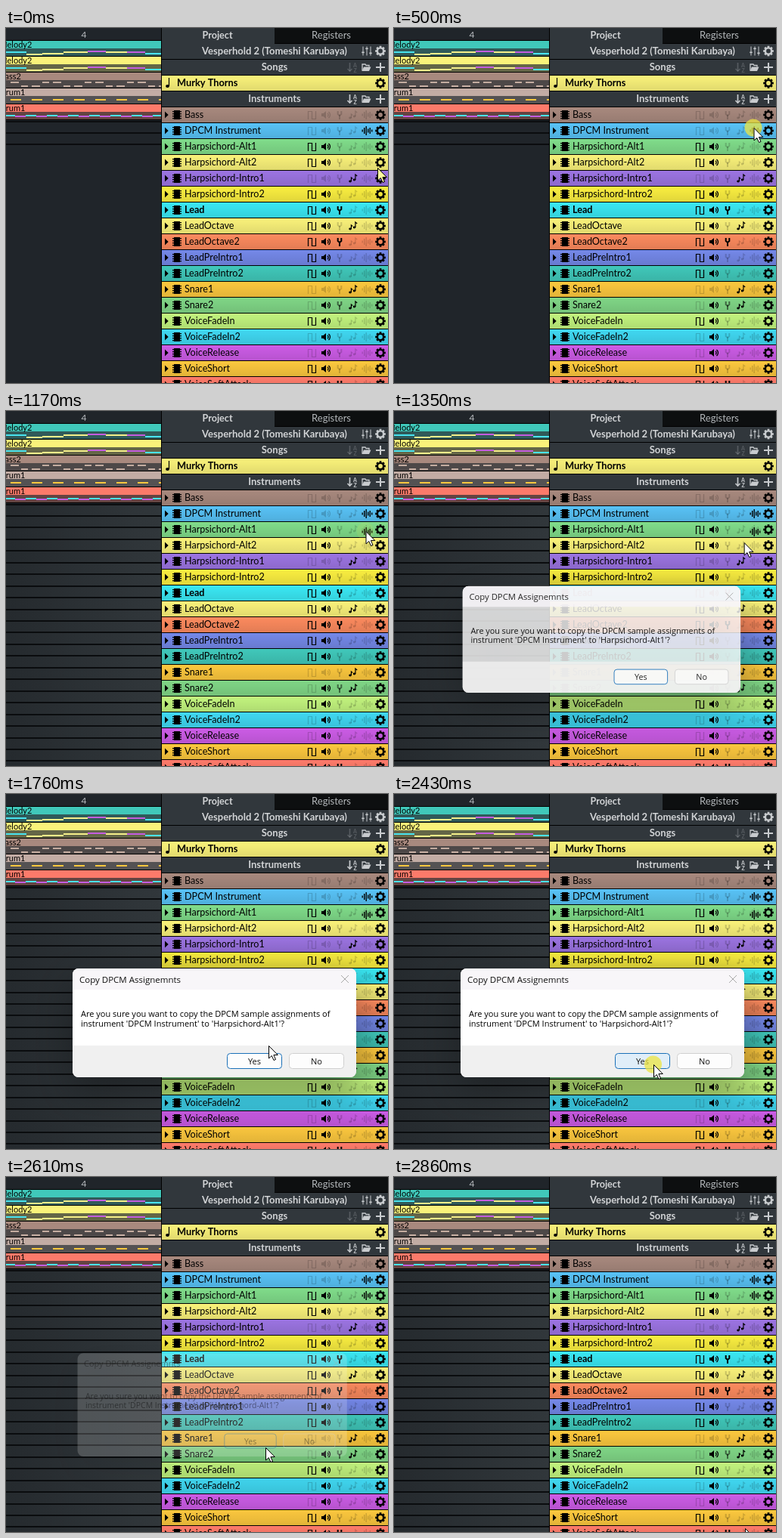
An HTML page with a canvas for the animation above (2.95 s loop, 505 by 470 pixels).

```html
<!DOCTYPE html>
<html lang="en">
<head>
<meta charset="utf-8">
<title>Instrument panel</title>
<style>
html, body { margin: 0; width: 505px; height: 470px; overflow: hidden; background: #1e2327; }
canvas { display: block; }
</style>
</head>
<body>
<canvas id="stage" width="505" height="470"></canvas>
<script>
const c = document.getElementById('stage').getContext('2d');
const LOOP = 2950, TICK = 84.2;
const LIGHT = '#c8cbce', UI = 'Lato, sans-serif', DIALOG = '"Open Sans", sans-serif';

// name, colour, state of each icon: 0 dim, 1 on, 2 half
const instruments = [
  ['Bass', '#a8897e', '00000'],
  ['DPCM Instrument', '#58c2f6', '00001'],
  ['Harpsichord-Alt1', '#80dc8a', '11000'],
  ['Harpsichord-Alt2', '#faf27a', '11000'],
  ['Harpsichord-Intro1', '#9c74e2', '00010'],
  ['Harpsichord-Intro2', '#faee40', '11000'],
  ['Lead', '#3ae8f4', '11100'],
  ['LeadOctave', '#faf27a', '11010'],
  ['LeadOctave2', '#fc8a5e', '11100'],
  ['LeadPreIntro1', '#7488e8', '11000'],
  ['LeadPreIntro2', '#40c8ba', '11000'],
  ['Snare1', '#fcc83e', '00010'],
  ['Snare2', '#80d686', '01210'],
  ['VoiceFadeIn', '#c2f47e', '11000'],
  ['VoiceFadeIn2', '#40d8f2', '01000'],
  ['VoiceRelease', '#cc5ce6', '01000'],
  ['VoiceShort', '#fcc83e', '11000'],
  ['VoiceSoftAttack', '#fc7a6a', '11100']
];

const rect = (x, y, w, h, fill) => { c.fillStyle = fill; c.fillRect(x, y, w, h); };
const lerp = (a, b, p) => a + (b - a) * p;

function text(str, x, y, font, fill = '#000', align = 'left') {
  c.font = font;
  c.fillStyle = fill;
  c.textAlign = align;
  c.fillText(str, x, y);
}

function line(points, width) {
  c.lineWidth = width;
  c.beginPath();
  points.forEach(([x, y]) => c.lineTo(x, y));
  c.stroke();
}

function shape(points) {
  c.beginPath();
  points.forEach(([x, y]) => c.lineTo(x, y));
  c.closePath();
  c.fill();
}

function blob(x, y, rx, ry = rx) {
  c.beginPath();
  c.ellipse(x, y, rx, ry, 0, 0, 7);
  c.fill();
}

const icons = {
  pulse() { line([[-5.5, 6], [-5.5, -4.5], [-0.5, -4.5], [-0.5, 5.5], [4.5, 5.5], [4.5, -5]], 1.2); },
  speaker() {
    shape([[-6, -2], [-3.5, -2], [0, -5], [0, 5], [-3.5, 2], [-6, 2]]);
    c.lineWidth = 1.3;
    for (const r of [2.6, 5]) {
      c.beginPath();
      c.arc(0.5, 0, r, -0.95, 0.95);
      c.stroke();
    }
  },
  fork() {
    line([[-2.3, -5], [-2.3, -1], [0, 1], [2.3, -1], [2.3, -5]], 2);
    line([[0, 0], [0, 6]], 2);
  },
  notes() {
    blob(-4, 4, 1.8, 1.4);
    blob(1.5, 2, 1.8, 1.4);
    line([[-2.6, 4], [-2.6, -1], [-0.8, 0.5]], 1.2);
    line([[2.9, 2], [2.9, -5], [5.2, -3]], 1.2);
  },
  sample() { [3, 8, 12, 5, 8, 3].forEach((h, i) => c.fillRect(i * 2.5 - 6.5, -h / 2, 1.4, h)); },
  gear() {
    c.lineWidth = 2.4;
    c.beginPath();
    c.arc(0, 0, 4.1, 0, 7);
    c.stroke();
    for (let i = 0; i < 8; i++) {
      c.rotate(Math.PI / 4);
      c.fillRect(-1.4, -6.8, 2.8, 2.4);
    }
  },
  chip() {
    c.fillRect(-4, -6, 8, 12);
    for (let y = -5; y < 5; y += 3) c.fillRect(-6, y, 12, 1.3);
  },
  arrow() { shape([[-2, -4.5], [2.7, 0], [-2, 4.5]]); },
  quarter() {
    blob(-1.5, 4.5, 2.4, 1.9);
    line([[0.5, 4.5], [0.5, -6.5]], 1.2);
  },
  sliders() {
    [-5, 0, 5].forEach((x, i) => {
      line([[x, -6], [x, 6]], 1);
      c.fillRect(x - 1.7, [1, -4, 2][i], 3.4, 1.6);
    });
  },
  plus() { c.fillRect(-6, -1, 12, 2); c.fillRect(-1, -6, 2, 12); },
  folder() {
    line([[-5, 4.5], [-5, -4], [-1, -4], [0, -2.5], [4, -2.5], [4, -0.5]], 1.3);
    shape([[-5.5, 5], [-3, -0.5], [6.5, -0.5], [4, 5]]);
  },
  sort() {
    line([[-3.5, -6], [-3.5, 5]], 1.7);
    line([[-6.5, 2], [-3.5, 5.2], [-0.5, 2]], 1.6);
    text('A', 3.5, -0.5, 'bold 7px ' + UI, c.fillStyle, 'center');
    text('Z', 3.5, 6.5, 'bold 7px ' + UI, c.fillStyle, 'center');
  }
};

function icon(name, x, y, color = '#000', alpha = 1) {
  c.save();
  c.translate(x, y);
  c.globalAlpha *= alpha;
  c.fillStyle = c.strokeStyle = color;
  icons[name]();
  c.restore();
}

function colorRow(y, color) {
  rect(206, y, 299, 20, color);
  const shade = c.createLinearGradient(0, y, 0, y + 20);
  shade.addColorStop(0, 'rgba(0,0,0,0)');
  shade.addColorStop(1, 'rgba(0,0,0,.1)');
  rect(206, y, 299, 20, shade);
}

function header(y, title) {
  rect(206, y, 299, 20, '#31373c');
  text(title, 355, y + 14, 'bold 13px ' + UI, '#d2d4d6', 'center');
}

function drawPanel(tick) {
  rect(205, 0, 300, 470, '#000');
  rect(206, 0, 149, 21, '#31373c');
  rect(355, 0, 150, 20, '#0d0f10');
  text('Project', 279.5, 14, 'bold 12.6px ' + UI, '#d2d4d6', 'center');
  text('Registers', 430, 14, '13px ' + UI, '#b4b8bb', 'center');

  header(21, 'Vesperhold 2 (Tomeshi Karubaya)');
  icon('sliders', 477, 30.5, LIGHT);
  icon('gear', 495, 30.5, LIGHT);
  [[42, 'Songs', 0.25], [84, 'Instruments', 1]].forEach(([y, title, sortAlpha]) => {
    header(y, title);
    icon('sort', 458, y + 10, LIGHT, sortAlpha);
    icon('folder', 476, y + 10, LIGHT);
    icon('plus', 495, y + 10, LIGHT);
  });

  colorRow(63, '#faf27a');
  icon('quarter', 215, 72.5);
  text('Murky Thorns', 226, 77, 'bold 12.8px ' + UI);
  icon('gear', 495, 73);

  const kinds = ['pulse', 'speaker', 'fork', 'notes', 'sample'];
  instruments.forEach(([name, color, states], i) => {
    const y = 105 + 21 * i, mid = y + 10;
    colorRow(y, color);
    icon('arrow', 212, mid);
    icon('chip', 226, mid);
    text(name, 236, mid + 4, (name === 'Lead' ? 'bold ' : '') + '12.6px ' + UI);
    kinds.forEach((kind, k) => {
      const copied = i === 2 && k === 4 && tick >= 30;
      icon(kind, 405 + 18 * k, mid, '#000', copied ? 1 : [0.17, 1, 0.5][states[k]]);
    });
    icon('gear', 495, mid);
  });
}

function track(y, name, color) {
  rect(0, y, 205, 20, '#2a2f33');
  c.globalAlpha = 0.28;
  rect(0, y + 10, 205, 10, color);
  c.globalAlpha = 1;
  rect(0, y, 205, 10, color);
  text(name, -8.5, y + 9, '11px ' + UI);
}

function drawTracks(tick) {
  rect(0, 0, 205, 470, '#20252a');
  if (tick >= 7) {
    const glow = c.createLinearGradient(0, 0, 205, 0);
    glow.addColorStop(0, '#252a2e');
    glow.addColorStop(1, '#31373b');
    rect(0, 123, 205, 347, glow);
  }
  const lineCount = tick >= 7 ? 23 : 3;
  for (let i = 0; i < lineCount; i++) rect(0, Math.round(122.5 + 15.45 * i), 205, 2, '#0a0c0e');
  rect(0, 16, 205, 106, '#000');
  text('4', 103, 13, '12px ' + UI, '#b8bcc0', 'center');

  track(17, 'Melody2', '#40c8ba');
  track(38, 'Melody2', '#faf27a');
  track(59, 'Bass2', '#a8897e');
  track(80, 'Drum1', '#c2aca4');
  track(101, 'Drum1', '#fc7a6a');

  const cyan = '#48e4f0', cream = '#f6f08a', violet = '#c45ce0';
  // start, end, drop, colour
  const melody = [
    [0, 27, 3, cyan], [27, 48, 6, cream], [48, 76, 5, cream], [76, 108, 3, cream],
    [108, 132, 2, violet], [132, 160, 3, cream], [160, 184, 3, violet], [184, 205, 5, cyan]
  ];
  for (const y of [28, 49]) {
    melody.forEach(([from, to, drop, color]) => rect(from, y + drop, to - from, 2, color));
  }
  for (let i = 0; i < 8; i++) {
    const x = 6 + 28 * i;
    rect(x, 71 + 5 * (i % 2), 11, 2, '#c4aca0');
    rect(x + 14, 76 - 5 * (i % 2), 9, 2, '#c4aca0');
    rect(x, 94, 14, 2, '#fcc83e');
    rect(x - 8, 115, 14, 2, cyan);
    rect(x + 6, 116, 14, 2, violet);
  }
}

function box(x, y, w, h, r) {
  c.beginPath();
  c.roundRect(x, y, w, h, r);
}

function button(x, label, border, fill, fillAlpha) {
  box(x + 0.5, 343.5, 72, 20, 4);
  c.save();
  c.globalAlpha = fillAlpha;
  c.fillStyle = fill;
  c.fill();
  c.restore();
  c.lineWidth = 1;
  c.strokeStyle = border;
  c.stroke();
  text(label, x + 36.5, 358, '11px ' + DIALOG, '#111', 'center');
}

// opacity and scale while the dialog opens and closes, by tick
const fades = { 15: [0.3, 0.95], 16: [0.8, 0.98], 30: [0.75, 0.98], 31: [0.18, 0.95] };

function drawDialog(tick) {
  const [alpha, scale] = fades[tick] || [1, 1];
  c.save();
  c.translate(219, 274);
  c.scale(scale, scale);
  c.translate(-219, -274);
  c.globalAlpha = alpha;
  c.save();
  c.shadowColor = 'rgba(0,0,0,.36)';
  c.shadowBlur = 52;
  c.shadowOffsetY = 18;
  box(88, 231, 375, 144, 8);
  c.fillStyle = '#fff';
  c.fill();
  c.restore();

  if (alpha > 0.5) {
    c.save();
    box(88, 231, 375, 144, 8);
    c.clip();
    rect(88, 231, 375, 28, '#f8f6f9');
    rect(88, 333, 375, 42, '#f0f0f0');
    c.restore();
  }

  // ink fades later than the panel
  c.globalAlpha = Math.sqrt(alpha);
  text('Copy DPCM Assignemnts', 97, 250, '11.5px ' + DIALOG, '#111');
  c.strokeStyle = '#a8a8a8';
  line([[443, 240], [453, 250]], 1);
  line([[453, 240], [443, 250]], 1);
  text('Are you sure you want to copy the DPCM sample assignments of', 99, 295, '11px ' + DIALOG);
  text("instrument 'DPCM Instrument' to 'Harpsichord-Alt1'?", 99, 308, '11px ' + DIALOG);
  button(292, 'Yes', '#1a70b8', tick >= 23 ? '#e0eef9' : '#fdfdfd', alpha ** 2);
  button(374, 'No', '#d0d0d0', '#fdfdfd', alpha ** 2);
  c.restore();
}

// tick, x, y
const path = [
  [0, 491, 185], [4, 475.5, 132], [7, 475.5, 132], [12, 475.5, 159], [15, 475.5, 159],
  [20, 352, 304], [21, 347, 333], [25, 343, 358], [31, 343, 358], [34, 464, 465]
];

function pointerAt(tick) {
  const i = Math.min(path.findLastIndex(k => k[0] <= tick), path.length - 2);
  const [t0, x0, y0] = path[i], [t1, x1, y1] = path[i + 1];
  const p = (tick - t0) / (t1 - t0);
  const eased = t0 === 21 ? 1 - (1 - p) ** 2 : p * p * (3 - 2 * p);
  return [lerp(x0, x1, eased), lerp(y0, y1, eased)];
}

function drawPointer(tick, x, y) {
  const halo = tick >= 6 && tick <= 13 ? 0.75 : tick === 14 ? 0.12 : tick === 29 || tick === 30 ? 0.75 : 0;
  c.save();
  c.globalAlpha = halo;
  c.fillStyle = '#ece440';
  blob(x - 0.5, y, 11.5);
  c.globalAlpha = 1;
  c.translate(x + 0.5, y + 0.5);
  c.fillStyle = tick === 0 ? '#fdfaa0' : '#fff';
  c.strokeStyle = '#000';
  c.lineWidth = 1;
  shape([[0, 0], [0, 16.5], [3.8, 13], [6.5, 19], [9, 18], [6.4, 12], [11.8, 12]]);
  c.stroke();
  c.restore();
}

function frame(now) {
  const tick = Math.min(34, Math.floor((now % LOOP + 14) / TICK));
  const [x, y] = pointerAt(tick);
  drawTracks(tick);
  drawPanel(tick);
  if (tick >= 7 && tick < 30) icon('sample', 477, tick < 15 ? y + 1 : 160);
  if (tick >= 15 && tick <= 31) drawDialog(tick);
  drawPointer(tick, x, y);
}

let start;
function loop(now) {
  start ??= now;
  frame(now - start);
  requestAnimationFrame(loop);
}
frame(0);
requestAnimationFrame(loop);
</script>
</body>
</html>
```
